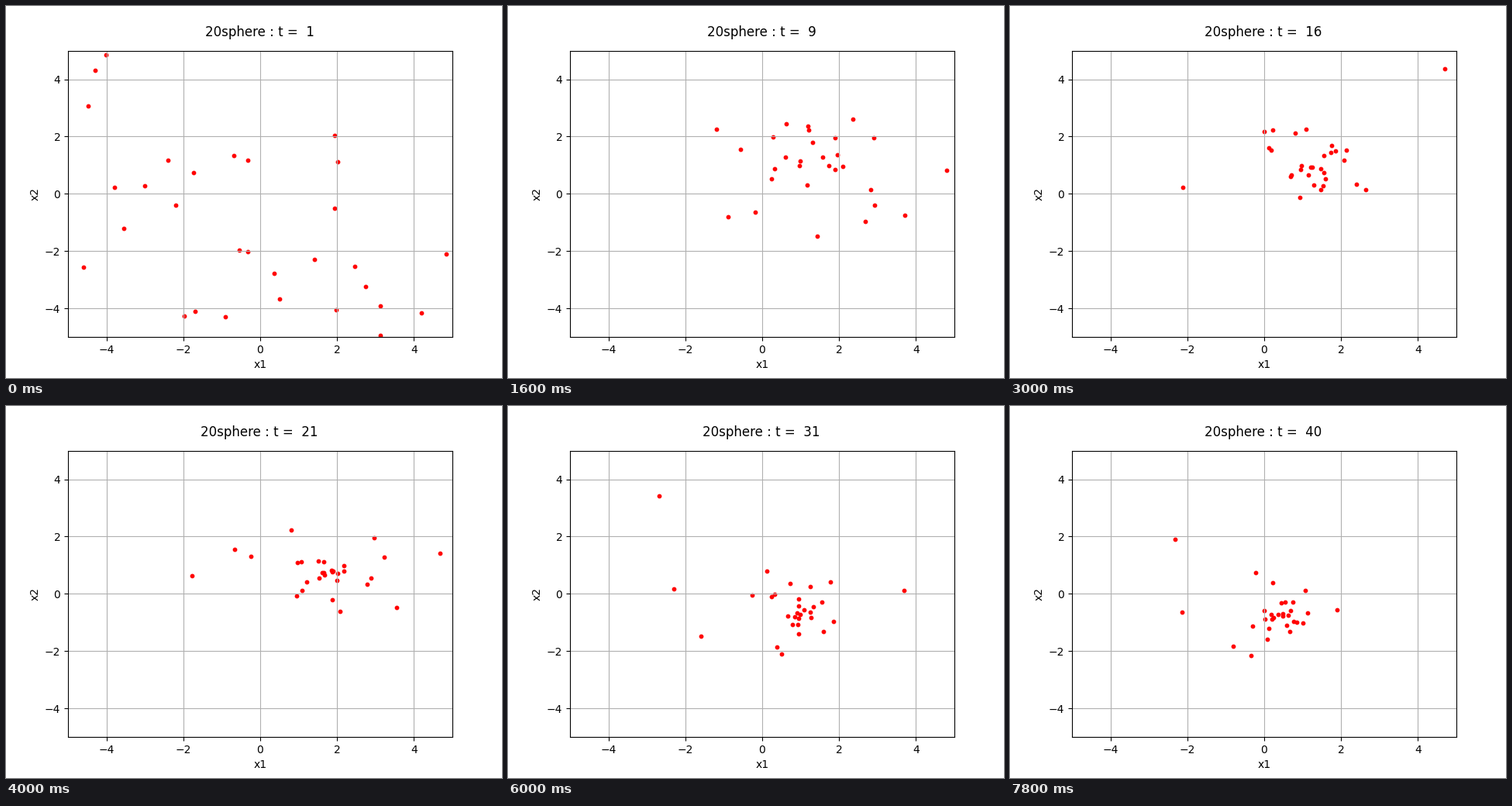
Animation, 640 px wide and 480 px high, one loop 8 s. Source, as a matplotlib script:

```python
import numpy as np
import matplotlib.pyplot as plt
from matplotlib.animation import FuncAnimation

STEPS = 40
SWARM = 30
rng = np.random.default_rng(20)

# Step, centre x, centre y and spread of the swarm.
path = np.array([(1, 0.7, 0.0, 1.9),
                 (5, 1.4, 1.7, 1.6),
                 (12, 1.2, 0.8, 1.0),
                 (21, 1.6, 0.8, 0.8),
                 (27, 0.3, -1.0, 0.75),
                 (34, 1.2, -0.5, 0.75),
                 (40, 0.4, -0.8, 0.6)])

home = rng.uniform(-5, 5, (SWARM, 2))

# Each particle swings around the centre; a few have a much wider reach.
reach = rng.lognormal(0, 0.6, (SWARM, 1))
a, b = rng.normal(0, 1, (2, SWARM, 2)) * reach
speed = rng.uniform(0.4, 0.9, (SWARM, 2))


def swarm(t):
    x, y, spread = (np.interp(t, path[:, 0], col) for col in path.T[1:])
    swing = a * np.cos(speed * t) + b * np.sin(speed * t)
    orbit = np.array([x, y]) + spread * swing
    return orbit + (home - orbit) * np.exp(-(t - 1) / 2)


fig, ax = plt.subplots(figsize=(6.4, 4.8), dpi=100)
ax.set(xlim=(-5, 5), ylim=(-5, 5), xlabel="x1", ylabel="x2")
ax.grid(True)
dots = ax.scatter(*home.T, s=10, c="red")
title = ax.text(0.498, 1.05, "", ha="center", fontsize="large",
                transform=ax.transAxes)


def update(i):
    t = i + 1
    dots.set_offsets(swarm(t))
    title.set_text(f"20sphere : t =  {t}")
    return dots, title


anim = FuncAnimation(fig, update, frames=STEPS, interval=200, repeat=True,
                     repeat_delay=0)
plt.show()
```
